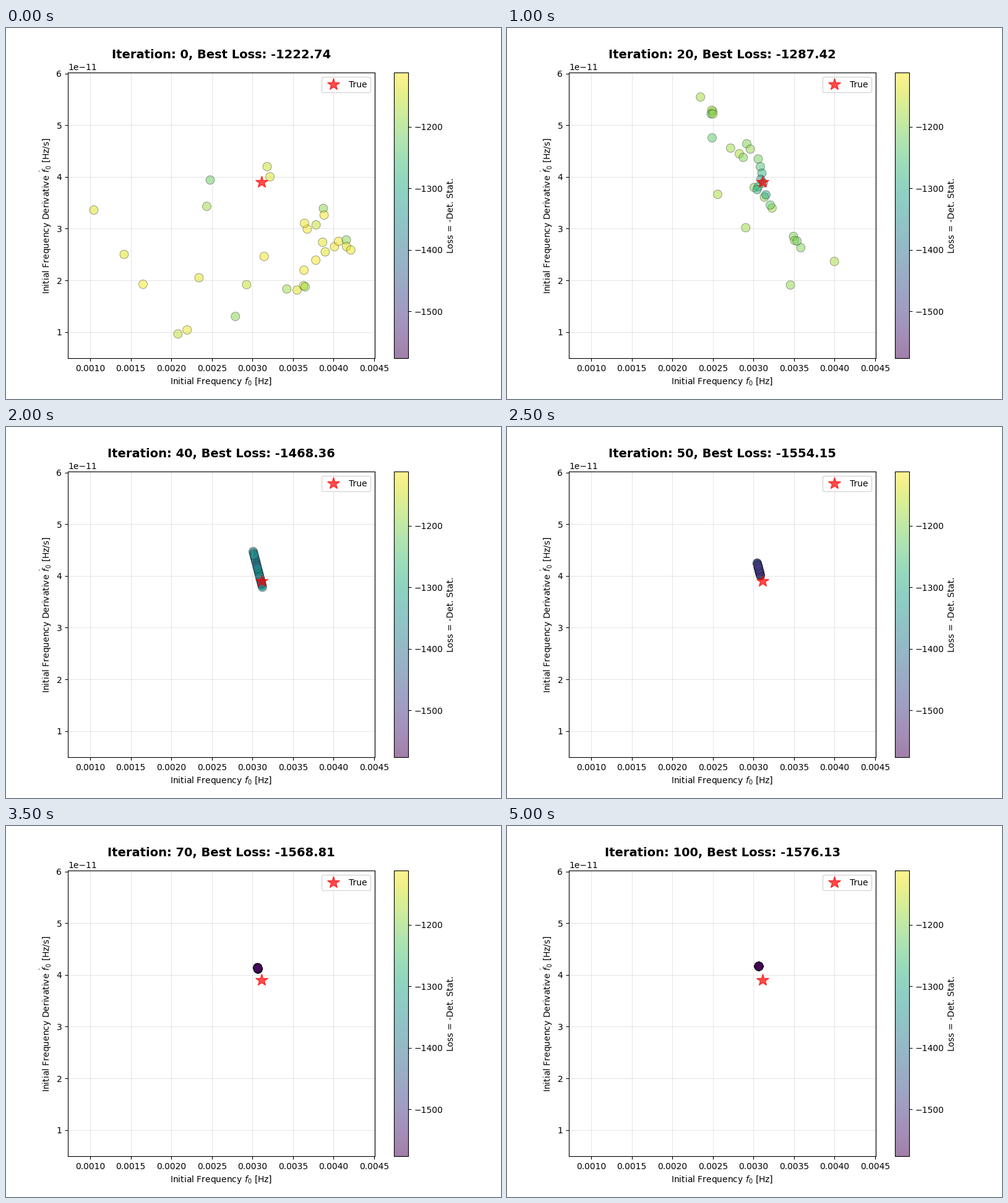
These frames come from a looping animation (800x600 px, 5.5 s). A matplotlib script:

```python
import numpy as np
import matplotlib.pyplot as plt
from matplotlib.animation import FuncAnimation

W, H, DPI = 800, 600, 100
COUNT, STEP = 31, 10
STAR = np.array([413.4, 248.5])
BEST = [-1222.74, -1231.17, -1287.42, -1355.77, -1468.36, -1554.15,
        -1564.27, -1568.81, -1571.93, -1574.44, -1576.13]


def along(path, n):
    """n stage points that follow a path and bunch up at its corners."""
    path = np.array(path, float)
    s = np.linspace(0, len(path) - 1, n)
    i = np.minimum(s.astype(int), len(path) - 2)
    f = s - i
    f = (f**3 / (f**3 + (1 - f)**3))[:, None]
    return path[i] * (1 - f) + path[i + 1] * f


def scored(xy, worst, gain, scatter, jitter, best, seed):
    """Jitter the points; the loss falls near the star and by chance."""
    rng = np.random.default_rng(seed)
    xy = xy + rng.normal(0, jitter, xy.shape)
    near = np.exp(-(np.hypot(*(xy - STAR).T) / 35) ** 2)
    loss = worst - gain * near - rng.exponential(scatter, len(xy))
    return np.column_stack([xy, np.maximum(loss, best)])


def scattered():
    left = along([(141, 297), (212, 408), (282, 494), (366, 468),
                  (415, 370), (425, 228), (325, 245), (317, 400)], 13)
    right = along([(460, 432), (478, 415), (488, 318), (517, 297),
                   (510, 370), (537, 340), (554, 360)], COUNT - 13)
    return scored(np.vstack([left, right]), -1117, 0, 28, 5, BEST[0], 2)


def searching():
    band = along([(312, 110), (332, 136), (333, 178), (375, 203), (405, 262),
                  (429, 287), (465, 342), (475, 355), (455, 420)], COUNT - 5)
    strays = [(339, 270), (363, 352), (384, 323), (403, 495), (529, 377)]
    return scored(np.vstack([band, strays]), -1170, 20, 14, 2, BEST[1], 1)


def gathering():
    band = along([(332, 135), (332, 139), (390, 190), (405, 212), (409, 225),
                  (411, 245), (414, 250), (404, 262), (417, 269),
                  (427, 290)], COUNT - 4)
    strays = [(382, 210), (384, 323), (468, 344), (530, 377)]
    return scored(np.vstack([band, strays]), -1182, 95, 20, 1, BEST[3], 3)


def converging(k):
    """A slanted streak that shrinks to one spot and then drifts up."""
    rng = np.random.default_rng(k)
    dy = rng.permutation(np.linspace(-1, 1, COUNT)) * 29 * 0.36 ** (k - 4)
    y = 230.2 - 3.2 * (max(0, k - 7) / 3) ** 2
    spread = 140 * np.exp(-((k - 4) / 1.6) ** 2)
    loss = BEST[k] + spread * (1 - rng.random(COUNT) ** 3)
    return np.column_stack([407 + 0.26 * dy, y + dy, loss])


def swarm(k):
    if k == 0:
        return scattered()
    if k == 1:
        return searching()
    if k == 2:
        # every other particle has already improved
        moved = np.arange(COUNT)[:, None] % 2 == 1
        return np.where(moved, gathering(), searching())
    if k == 3:
        return gathering()
    return converging(k)


def to_data(xy):
    flipped = np.column_stack([xy[:, 0], H - xy[:, 1]])
    return ax.transData.inverted().transform(flipped)


def title(k):
    return f"Iteration: {k * STEP}, Best Loss: {BEST[k]:.2f}"


fig, ax = plt.subplots(figsize=(W / DPI, H / DPI), dpi=DPI)
dots = ax.scatter(np.zeros(COUNT), np.zeros(COUNT), c=np.zeros(COUNT), s=100,
                  cmap="viridis", vmin=BEST[-1], vmax=-1111.8, alpha=0.5,
                  edgecolors="black", linewidths=0.5)
fig.colorbar(dots, ax=ax, label="Loss = -Det. Stat.")
ax.set_xlim(0.0007243, 0.0045083)
ax.set_ylim(0.4921e-11, 6.0211e-11)
ax.plot(*to_data(STAR[None])[0], "r*", markersize=15, alpha=0.7, label="True")
ax.set_xlabel(r"Initial Frequency $f_0$ [Hz]")
ax.set_ylabel(r"Initial Frequency Derivative $\dot{f}_0$ [Hz/s]")
ax.grid(True, alpha=0.3)
ax.legend(loc="upper right")
heading = ax.set_title(title(0), fontsize=14, fontweight="bold",
                       y=1.0, pad=16.5)


def update(k):
    pose = swarm(k)
    dots.set_offsets(to_data(pose[:, :2]))
    dots.set_array(pose[:, 2])
    heading.set_text(title(k))
    return dots, heading


anim = FuncAnimation(fig, update, frames=len(BEST), interval=500,
                     repeat=True, repeat_delay=0, blit=False)
plt.show()
```
